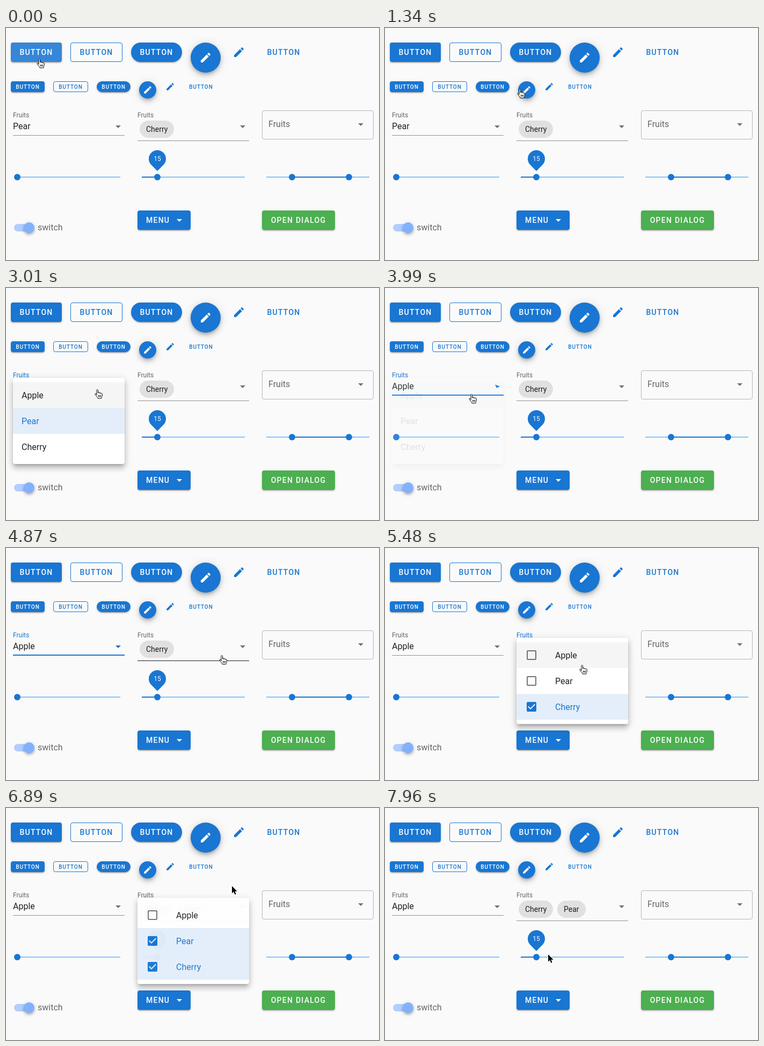
Write an HTML page that moves like this. It is 695x431 px and loops after 8000 ms.

```html
<!DOCTYPE html>
<html lang="en">
<head>
<meta charset="utf-8">
<title>Form components</title>
<style>
html, body { margin: 0; width: 100%; height: 100%; overflow: hidden; background: #fafafa; }
div, svg { position: absolute; box-sizing: border-box; white-space: nowrap; }
svg { overflow: visible; pointer-events: none; }
#stage { left: 0; top: 0; width: 695px; height: 431px; overflow: hidden; font: 16px Roboto, sans-serif; color: rgba(0,0,0,.87); }
.text { line-height: 24px; }
.small { font-size: 12px; }
.grey { color: rgba(0,0,0,.6); }
.btn { display: flex; align-items: center; justify-content: center; border-radius: 4px;
  font-weight: 500; font-size: 14px; letter-spacing: .0892857em; color: #1976d2; }
.mini { font-size: 10px; }
.outlined { border: 1px solid; }
.fill { background: #1976d2; color: #fff;
  box-shadow: 0 3px 1px -2px rgba(0,0,0,.2), 0 2px 2px rgba(0,0,0,.14), 0 1px 5px rgba(0,0,0,.12); }
.left { justify-content: flex-start; padding-left: 16px; }
.green { background: #4caf50; }
.round { border-radius: 28px; }
.fab { box-shadow: 0 3px 5px -1px rgba(0,0,0,.2), 0 6px 10px rgba(0,0,0,.14), 0 1px 18px rgba(0,0,0,.12); }
.btn.fill.over { background-image: linear-gradient(rgba(255,255,255,.12) 0 100%); }
.blue { background: #1976d2; }
.track { background: #86c4fa; }
.dot { border-radius: 50%; }
.drop { border-radius: 50% 50% 0; transform: rotate(45deg); }
.value { line-height: 32px; text-align: center; color: #fff; font-size: 12px; }
.chip { background: #e0e0e0; border-radius: 16px; font-size: 14px; line-height: 32px; padding-left: 12px; }
.box { border: 1px solid rgba(0,0,0,.28); border-radius: 4px; }
.menu { background: #fff; border-radius: 4px;
  box-shadow: 0 5px 5px -3px rgba(0,0,0,.2), 0 8px 10px 1px rgba(0,0,0,.14), 0 3px 14px 2px rgba(0,0,0,.12); }
.row { line-height: 49px; }
.row.over { background: rgba(0,0,0,.04); }
.rail { background: #b2cefd; border-radius: 7px; }
.thumb { background: #82b1ff; border-radius: 50%;
  box-shadow: 0 2px 4px -1px rgba(0,0,0,.2), 0 4px 5px rgba(0,0,0,.14), 0 1px 10px rgba(0,0,0,.12); }
</style>
</head>
<body>
<div id="stage"></div>
<script>
const BLUE = '#1976d2', INK = 'rgba(0,0,0,.87)', GREY = 'rgba(0,0,0,.6)', ICON = 'rgba(0,0,0,.54)';
const PENCIL = 'M20.71,7.04C21.1,6.65 21.1,6 20.71,5.63L18.37,3.29C18,2.9 17.35,2.9 16.96,3.29L15.12,5.12L18.87,8.87M3,17.25V21H6.75L17.81,9.93L14.06,6.18L3,17.25Z';
const CARET = 'M7,10L12,15L17,10H7Z';
const SQUARE = 'M19,3H5C3.89,3 3,3.89 3,5V19A2,2 0 0,0 5,21H19A2,2 0 0,0 21,19V5C21,3.89 20.1,3 19,3';
const EMPTY = SQUARE + 'M19,5V19H5V5H19Z';
const CHECKED = 'M10,17L5,12L6.41,10.58L10,14.17L17.59,6.58L19,8' + SQUARE + 'Z';
const FRUITS = ['Apple', 'Pear', 'Cherry'];

const box = (x, y, w, h, cls, html = '', id = '') =>
  `<div id="${id}" class="${cls}" style="left:${x}px;top:${y}px;width:${w}px;height:${h}px">${html}</div>`;
const text = (x, cy, cls, str, id = '') =>
  `<div id="${id}" class="text ${cls}" style="left:${x}px;top:${cy - 12}px">${str}</div>`;
const icon = (cx, cy, size, d, color, id = '') =>
  `<svg id="${id}" viewBox="0 0 24 24" width="${size}" height="${size}" style="left:${cx - size / 2}px;top:${cy - size / 2}px"><path d="${d}" fill="${color}"/></svg>`;
const dot = (cx, r = 6, cy = 277, cls = 'dot blue') => box(cx - r, cy - r, 2 * r, 2 * r, cls);
const slider = (x, from, to) => box(x, 276, 192, 2, 'track') + box(from, 276, to - from, 2, 'blue') + dot(to);

const buttonRow = (y, w, h, xs, cls) =>
  ['fill', 'outlined', 'fill round', ''].map((style, i) =>
    box(xs[i], y, w + (i === 1 ? 2 : 0), h, `btn hot ${style} ${cls}`, 'BUTTON')).join('');

const field = (n, x, lineY, content) =>
  text(x, 162, 'small', 'Fruits', 'label' + n) + content + icon(x + 196, 183, 24, CARET, ICON, 'caret' + n) +
  box(x, lineY, 208, 1, '', '', 'line' + n) + box(x, 150, 208, lineY - 143, 'hot', '', 'field' + n);

const menu = (n, x, indent, checks) => box(x, 167, 208, 160, 'menu',
  FRUITS.map((name, i) => box(0, 8 + 48 * i, 208, 48, 'row hot',
    (checks ? icon(28, 24, 24, EMPTY, ICON) : '') + `<div style="left:${indent}px">${name}</div>`)).join(''), 'menu' + n);

const $ = id => document.getElementById(id);
$('stage').innerHTML =
  buttonRow(27, 95, 36, [9, 120, 233, 470], '') +
  box(344, 27, 56, 56, 'fill round fab hot') + icon(372, 55, 24, PENCIL, '#fff') + icon(434, 45, 24, PENCIL, BLUE) +
  buttonRow(99, 63, 20, [9, 88, 169, 332], 'mini') +
  box(248, 99, 32, 32, 'fill round fab hot', '', 'fab') + icon(264, 115, 18, PENCIL, '#fff') + icon(306, 109, 18, PENCIL, BLUE) +

  field(1, 13, 199, text(13, 183, '', 'Pear', 'fruit')) +
  field(2, 245, 209, box(249, 172, 64, 32, 'chip', 'Cherry') + box(321, 172, 53, 32, 'chip', 'Pear', 'pearChip')) +
  box(477, 153, 208, 54, 'box') + text(489, 179, 'grey', 'Fruits') + icon(661, 179, 24, CARET, ICON) +

  slider(21, 21, 21) + slider(253, 253, 282) + slider(485, 533, 639) + dot(533) +
  dot(282, 16, 242.5, 'drop blue') + box(266, 226.5, 32, 32, 'value', '15') +

  box(15, 364, 36, 14, 'rail') + dot(43, 10, 371, 'thumb') + text(59, 370.5, 'grey', 'switch') +
  box(245, 339, 99, 36, 'btn fill left', 'MENU') + icon(323, 357, 24, CARET, '#fff') +
  box(477, 339, 136, 36, 'btn fill green', 'OPEN DIALOG') +
  menu(1, 13, 16, false) + menu(2, 245, 72, true) +
  `<svg id="hand" width="16" height="18"><path fill="#fff" stroke="#000" stroke-linejoin="round"
    d="M4 10.5V2.2C4 0 6.6 0 6.6 2.2V7c0-1.6 2.5-1.6 2.5 0v.6c0-1.5 2.4-1.4 2.4.1v.7c0-1.3 2.7-1.2 2.7.2V12c0 2-1.3 2.8-1.3 5H6C6 15 3.5 13 1.2 9.9 .1 8.3 2.1 7.3 3.3 8.8z"/>
    <path fill="none" stroke="#000" d="M7.5 11v3.5M9.5 11v3.5M11.5 11v3.5"/></svg>
  <svg id="arrow" width="11" height="17"><path stroke="#fff" paint-order="stroke" stroke-width="2"
    d="M0 0V13.5L3.2 10.6 5.4 15.8 7.6 14.9 5.4 9.8H9.7Z"/></svg>`;

const STEP = 88.4, LOOP = 8000, FADE = 3.4;
const CLICK = { fab: 17, field1: 30.6, apple: 40, field2: 56.6, pear: 66, away: 77.6 };
const CLOSE = 42.3;
const MOVES = [
  { from: 2, to: 13, x: 245, y: 81 },
  { from: 14, to: 15, x: 251, y: 113 },
  { from: 15, to: 20, x: 254, y: 119 },
  { from: 25, to: 29, x: 170, y: 188 },
  { from: 40, to: 44, x: 161, y: 197 },
  { from: 50, to: 55, x: 402, y: 199 },
  { from: 61, to: 64, x: 326, y: 239 },
  { from: 71, to: 76, x: 421, y: 145 },
  { from: 85, to: 90, x: 304, y: 272 },
];

const clamp = v => Math.min(1, Math.max(0, v));
const fade = (s, start) => { const p = clamp((s - start) / FADE); return p * p * (3 - 2 * p); };
const ripple = (s, at) => clamp(Math.min(s - at, (at + 5 - s) / 2));

function cursorAt(s) {
  let x = 62, y = 57;
  for (const m of MOVES) {
    const p = 1 - (1 - clamp((s - m.from) / (m.to - m.from))) ** 1.5;
    x += (m.x - x) * p;
    y += (m.y - y) * p;
  }
  return [Math.round(x), Math.round(y)];
}

function setField(n, focused, hovered, open) {
  const line = $('line' + n).style;
  line.height = focused ? '2px' : '1px';
  line.marginTop = focused ? '-1px' : 0;
  line.background = focused ? BLUE : hovered ? INK : 'rgba(0,0,0,.42)';
  $('label' + n).style.color = focused ? BLUE : GREY;
  $('caret' + n).style.transform = `rotate(${180 * open}deg)`;
  $('caret' + n).firstChild.setAttribute('fill', focused ? BLUE : ICON);
}

function setMenu(n, open, active, clicked, glow) {
  const style = $('menu' + n).style;
  style.opacity = open;
  style.pointerEvents = open > .5 ? 'auto' : 'none';
  [...$('menu' + n).children].forEach((row, i) => {
    const on = active.includes(i), check = row.querySelector('path');
    row.style.color = on ? BLUE : INK;
    row.style.background = on ? `rgba(25,118,210,${.12 + (i === clicked ? .11 * glow : 0)})` : '';
    if (check) {
      check.setAttribute('d', on ? CHECKED : EMPTY);
      check.setAttribute('fill', on ? BLUE : ICON);
    }
  });
}

function setCursor([x, y]) {
  const under = document.elementFromPoint(x, y);
  const target = under && under.closest('.hot');
  document.querySelectorAll('.over').forEach(el => el.classList.remove('over'));
  if (target) target.classList.add('over');
  $('hand').style.display = target ? '' : 'none';
  $('arrow').style.display = target ? 'none' : '';
  $('hand').style.transform = `translate(${x - 5}px,${y}px)`;
  $('arrow').style.transform = `translate(${x}px,${y}px)`;
  return target ? target.id : '';
}

function render(s) {
  const open1 = fade(s, CLICK.field1) - fade(s, CLOSE);
  const open2 = fade(s, CLICK.field2) - fade(s, CLICK.away);
  const apple = s > CLICK.apple, pear = s >= CLICK.pear;
  setMenu(1, open1, [apple ? 0 : 1], 0, ripple(s, CLICK.apple));
  setMenu(2, open2, pear ? [1, 2] : [2], 1, ripple(s, CLICK.pear));
  const hovered = setCursor(cursorAt(s));
  setField(1, s > CLICK.field1 && s < CLICK.field2, hovered === 'field1', open1);
  setField(2, s > CLICK.field2 && s < CLICK.away, hovered === 'field2', open2);
  $('fab').style.backgroundImage = `linear-gradient(rgba(255,255,255,${.24 * ripple(s, CLICK.fab)}) 0 100%)`;
  $('fruit').textContent = apple ? 'Apple' : 'Pear';
  $('pearChip').style.display = pear ? '' : 'none';
}

function tick() {
  render(Math.floor(performance.now() % LOOP / STEP + .15));
  requestAnimationFrame(tick);
}
tick();
</script>
</body>
</html>
```
